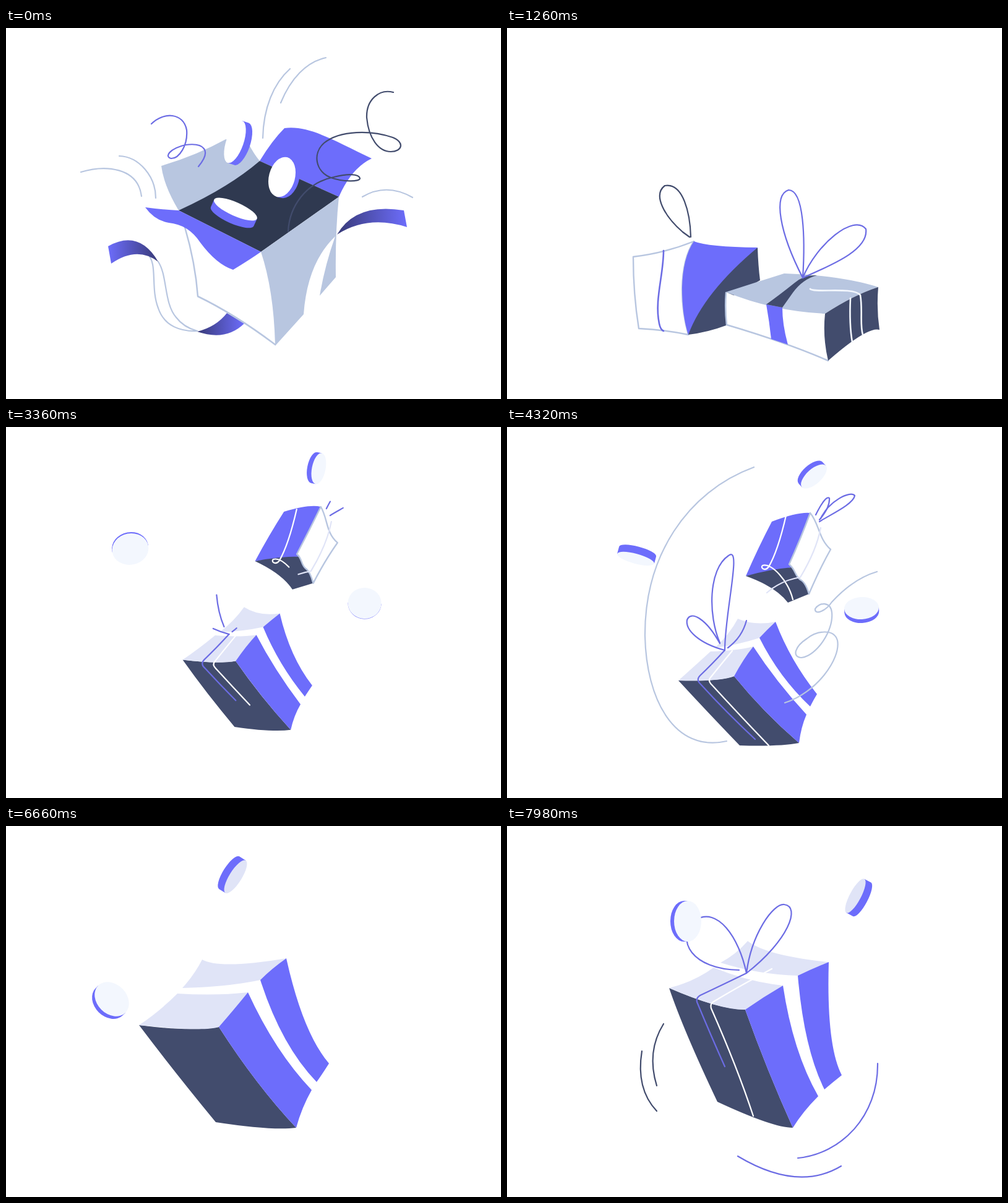
Write an HTML page that moves like this. It is 800 px wide and 600 px high and loops after 8 s.

```html
<!DOCTYPE html>
<html lang="en">
<head>
<meta charset="utf-8">
<title>Gift boxes</title>
<style>
html, body { margin: 0; width: 100%; height: 100%; overflow: hidden; background: #fff; }
svg { display: block; width: 100vw; height: 100vh; }
</style>
</head>
<body>
<svg viewBox="0 0 800 600">
  <defs>
    <linearGradient id="fadeR"><stop stop-color="#6d6dfb"/><stop offset="1" stop-color="#383a78"/></linearGradient>
    <linearGradient id="fadeL"><stop stop-color="#383a78"/><stop offset="1" stop-color="#6d6dfb"/></linearGradient>
  </defs>
  <g id="stage"></g>
</svg>
<script>
const LOOP = 8000, STEP = 60;
const VIOLET = '#6d6dfb', STRING = '#6c6ce4', MIST = '#b8c6e0', NAVY = '#424c6d',
  LILAC = '#e0e4f7', PALE = '#f3f7fe', WHITE = '#fff', INSIDE = '#2f3950';

const stage = document.getElementById('stage');
const clamp = v => Math.max(0, Math.min(1, v));
const span = (t, a, b) => clamp((t - a) / (b - a));
const easeOut = k => 1 - (1 - k) ** 3;
const lerp = (a, b, k) => a + (b - a) * k;

// Blends two paths that share one command structure.
function mix(a, b, k) {
  const goal = b.match(/-?\d+/g);
  let i = 0;
  return a.replace(/-?\d+/g, v => lerp(+v, +goal[i++], k).toFixed(1));
}

const fill = (d, color) => `<path d="${d}" fill="${color}"/>`;
const outlined = d => `<path d="${d}" fill="${WHITE}" stroke="${MIST}" stroke-width="2.4" stroke-linejoin="round"/>`;
const move = (x, y, body) => `<g transform="translate(${x.toFixed(1)} ${y.toFixed(1)})">${body}</g>`;

// Stroke showing only the part of the path between two fractions.
function line(d, color, to = 1, from = 0, width = 2.2) {
  if (to <= from) return '';
  const dash = from > 0 || to < 1
    ? `pathLength="1" stroke-dasharray="${(to - from).toFixed(3)} 2" stroke-dashoffset="${(-from).toFixed(3)}"` : '';
  return `<path d="${d}" fill="none" stroke="${color}" stroke-width="${width}" stroke-linecap="round" stroke-linejoin="round" ${dash}/>`;
}

// Disc with its rim pushed along the minor axis by h.
function coin([x, y, a, b, turn, h], face) {
  return `<g transform="translate(${x} ${y}) rotate(${turn})">` +
    fill(`M${-a} 0V${h}A${a} ${b} 0 0 ${h > 0 ? 0 : 1} ${a} ${h}V0Z`, VIOLET) +
    `<ellipse rx="${a}" ry="${b}" fill="${face}"/></g>`;
}

function coinMix(p, q, k, face) {
  const c = p.map((v, i) => lerp(v, q[i], k));
  if (p[5] * q[5] < 0) c[3] += (c[2] - c[3]) * .8 * Math.sin(Math.PI * clamp(k));
  return coin(c, face);
}

const GIFT_FILLS = [NAVY, LILAC, LILAC, VIOLET, VIOLET];
const gift = (p, q, k) => p.map((d, i) => fill(mix(d, q[i], k), GIFT_FILLS[i])).join('');

const TILT_A = [
  'M295 339Q340 351 376 351Q405 405 447 466Q420 468 362 451Q325 398 295 339Z',
  'M295 339Q325 325 348 308Q385 316 412 315Q395 330 376 351Q340 352 295 339Z',
  'M355 304Q380 289 398 270Q418 289 452 286Q440 293 424 304Q390 307 355 304Z',
  'M376 351Q395 330 412 315Q432 370 467 430Q454 446 447 466Q408 408 376 351Z',
  'M424 304Q440 293 452 286Q460 365 488 402Q481 411 475 418Q442 362 424 304Z'];
const TILT_B = [
  'M277 410Q340 412 367 403Q415 462 472 511Q440 517 376 515Q323 460 277 410Z',
  'M277 410Q305 385 329 363Q370 362 398 355Q382 375 367 403Q345 412 277 410Z',
  'M336 357Q360 335 373 310Q400 322 434 315Q420 328 408 341Q375 352 336 357Z',
  'M367 403Q382 375 398 355Q435 412 484 465Q475 486 472 511Q415 462 367 403Z',
  'M408 341Q420 328 434 315Q458 378 501 432Q495 442 490 452Q440 405 408 341Z'];
const FLOAT_A = [
  'M215 322Q300 333 344 325Q405 420 469 488Q430 493 339 479Q270 395 215 322Z',
  'M215 322Q248 300 277 271Q340 275 391 269Q370 295 344 325Q320 333 215 322Z',
  'M285 262Q305 240 317 216Q345 232 453 214Q430 230 411 249Q360 260 285 262Z',
  'M344 325Q370 295 391 269Q435 365 494 427Q478 455 469 488Q405 420 344 325Z',
  'M411 249Q430 230 453 214Q480 335 522 384Q512 400 502 414Q445 355 411 249Z'];
const FLOAT_B = [
  'M262 262Q340 296 385 297Q420 395 462 488Q430 488 340 446Q285 330 262 262Z',
  'M262 262Q302 252 334 229Q390 252 446 258Q415 276 385 297Q345 298 262 262Z',
  'M345 221Q370 208 389 186Q420 210 520 220Q490 232 470 242Q405 240 345 221Z',
  'M385 297Q415 276 446 258Q462 365 503 437Q478 462 462 488Q420 395 385 297Z',
  'M470 242Q495 230 520 220Q516 355 541 403Q527 414 513 426Q480 360 470 242Z'];

function openBox(t) {
  const u = t / 420, out = u * 14, rise = -430 * u;
  const arcs = ['M219 272C213 225 160 221 121 233', 'M242 275C242 240 215 208 183 207',
    'M415 178C416 130 432 90 459 66', 'M444 121C460 82 485 55 517 48'];
  return move(0, out, fill('M309 491Q340 483 357 461L385 478Q355 507 309 491Z', 'url(#fadeL)')) +
    line('M228 365C246 380 233 420 246 453C256 483 283 491 309 490', MIST) +
    line('M246 378C261 400 255 445 275 468Q287 484 309 490', MIST) +
    fill('M289 322Q306 380 310 434Q370 463 435 512L412 362Z', WHITE) +
    line('M289 322Q306 380 310 434Q370 463 435 512', MIST, 1, 0, 2.5) +
    fill('M251 223Q308 206 355 180L391 185Q400 203 410 215Q355 265 279 295Q255 255 251 223Z', MIST) +
    fill('M410 215Q430 182 450 162C490 157 530 182 591 211Q558 227 538 273Z', VIOLET) +
    fill('M279 295Q360 258 410 215L538 273L412 362Z', INSIDE) +
    fill('M412 362L538 273Q532 330 533 403L507 433Q515 385 532 337Q487 380 481 463L435 514Q433 425 412 362Z', MIST) +
    fill('M225 290Q255 294 279 295L412 362Q395 374 367 391Q340 382 314 347Q295 318 263 315Q240 311 225 290Z', VIOLET) +
    move(-out, 0, fill('M165 353Q215 325 246 378Q212 352 170 381Z', 'url(#fadeR)')) +
    move(out, 0, fill('M535 334Q565 282 643 295L648 322Q585 302 535 334Z', 'url(#fadeL)')) +
    arcs.map(d => line(d, MIST, 1, u)).join('') +
    line('M576 273Q615 250 657 274', MIST, 1, u) +
    line('M311 224C333 198 320 185 290 189C265 195 255 208 267 211C280 211 294 190 292 165C287 137 255 135 235 155', STRING, 1, u) +
    line('M456 329C458 288 485 250 530 241C553 235 570 236 572 243C572 249 545 249 525 242C500 232 495 203 514 186C540 165 590 165 625 177C645 185 640 200 622 200C602 200 586 178 583 145C582 116 603 98 626 104', NAVY, 1, u) +
    move(0, rise, coin([370, 184, 36, 14, -71, 11], WHITE) +
      coin([446, 241, 33, 21, -75, 7], WHITE) + coin([371, 293, 38, 11, 24, 13], WHITE));
}

function twoGifts(t) {
  const drop = -320 * (1 - easeOut(span(t, 420, 660)));
  const bow = span(t, 630, 1060), bow2 = span(t, 720, 1200), gone = span(t, 660, 900);
  const left = outlined('M204 370Q255 364 302 345Q284 372 283 423Q283 460 293 496Q255 488 213 486Q204 430 204 370Z') +
    fill('M405 355Q406 385 409 408L354 440V481Q325 492 293 496L310 420Z', NAVY) +
    fill('M302 345Q325 354 405 355Q318 428 293 496Q283 465 283 420Q284 372 302 345Z', VIOLET) +
    line('M253 360C253 400 238 440 246 478Q248 488 253 490', STRING, 1, 0, 2.6) +
    line('M295 338L284 330C255 305 235 270 255 255C285 250 296 300 297 338', NAVY, bow);
  const right = fill('M354 427Q430 462 514 462L519 538Q450 508 355 480Q352 455 354 427Z', WHITE) +
    line('M354 428Q352 455 355 480Q450 508 519 538', MIST, 1, 0, 2.5) +
    fill('M354 427Q400 412 448 397Q540 400 600 419Q560 432 514 462Q430 458 354 427Z', MIST) +
    fill('M514 462Q560 432 600 419Q597 455 602 488Q583 482 519 538Q510 500 514 462Z', NAVY) +
    fill('M419 447Q424 475 427 503L454 512Q445 480 445 452Z', VIOLET) +
    fill('M419 447Q440 432 465 412Q480 399 501 400Q478 406 462 428L445 452Z', NAVY) +
    line('M575 496C570 480 575 455 571 432C560 418 497 429 490 422', PALE, 1, 0, 2.6) +
    line('M555 437Q553 480 558 508', PALE, 1, 0, 2.6) +
    line('M478 404C440 330 430 270 455 262C480 262 482 340 478 404', STRING, bow2) +
    line('M478 404C500 350 560 300 580 325C585 360 520 385 478 404', STRING, bow2);
  const marks = t < 600 ? '' :
    line('M157 416L155 404', STRING, 1, gone) +
    line('M287 518Q310 519 330 506', STRING, 1, gone) +
    line('M617 471Q617 498 600 515', MIST, 1, gone);
  return move(0, drop, left + right) + marks;
}

function tumbling(t) {
  const k = (t - 2280) / 2040;
  const tie = span(t, 2700, 3600), bow = span(t, 3200, 4140), swirl = span(t, 3480, 4300);
  const small = fill(mix('M473 119Q515 110 530 118Q510 153 486 187L488 190Q455 187 421 190Q446 153 473 119Z',
      'M428 153Q470 137 490 139Q475 180 456 222L460 227Q425 233 386 241Q406 195 428 153Z', k), VIOLET) +
    fill(mix('M421 190Q455 187 488 190C492 193 490 202 495 208C500 212 503 220 506 233L473 239Q460 214 421 190Z',
      'M386 241Q425 230 460 227C466 230 466 241 474 247C481 250 484 258 488 270L454 284Q434 258 386 241Z', k), NAVY) +
    outlined(mix('M530 118C537 138 532 160 550 175Q527 200 506 233C503 220 500 212 495 208C489 200 493 193 486 187Q508 152 530 118Z',
      'M490 139C505 157 503 180 523 198Q505 230 488 270C484 256 480 250 474 247C465 240 466 230 456 222Q475 180 490 139Z', k));
  const smallTies =
    line('M451 143Q438 200 423 226C417 234 409 228 413 224C428 219 455 250 462 279', WHITE, tie) +
    line('M507 163Q500 200 474 243Q443 248 420 268', LILAC, tie) +
    line('M499 142Q515 110 521 115Q522 130 505 150', STRING, bow) +
    line('M505 153C520 143 560 125 562 111C555 102 520 120 507 148', STRING, bow);
  const bigTies =
    line('M352 361Q330 385 312 402Q305 409 313 416Q355 462 401 505', STRING, tie) +
    line('M364 362Q345 385 329 405Q324 410 331 417Q375 465 423 515', WHITE, tie) +
    line('M352 361C310 350 288 328 291 312C297 296 322 310 344 350', STRING, bow) +
    line('M344 349C325 305 325 230 358 208C380 190 352 300 352 361', STRING, bow) +
    line('M357 357Q380 340 387 313', STRING, bow);
  return line('M355 508C270 527 225 440 223 338C222 210 290 105 399 65', MIST, swirl) +
    small + move(40 * (1 - k), -21 * (1 - k), smallTies) +
    gift(TILT_A, TILT_B, k) + move(18 * (1 - k), -55 * (1 - k), bigTies) +
    line('M449 446C500 430 540 375 534 345C528 325 500 330 485 342C465 355 460 372 476 373C500 370 528 330 525 300C523 282 505 283 498 294C497 305 515 298 525 283Q560 245 598 234', MIST, swirl) +
    coinMix([193, 180, 28, 9, -39, 9], [208, 213, 31, 8, 15, -12], k, PALE) +
    coinMix([516, 53, 25, 10, 60, 7], [496, 80, 26, 12, 138, 8], k, PALE) +
    coinMix([587, 276, 26, 17, 8, -6], [573, 293, 28, 18, -3, 6], k, PALE);
}

function flatGift(t) {
  const away = 1 - easeOut(span(t, 4380, 4800));
  const tie = span(t, 4800, 5400), loop = .58 * span(t, 4980, 5460) + .42 * span(t, 5460, 5820);
  const arcIn = span(t, 5160, 5400), arcOut = span(t, 5520, 5940);
  const box = outlined('M211 351Q218 380 218 406Q245 424 310 443Q355 455 388 475L380 404Q290 370 211 351Z') +
    fill('M210 351Q360 332 484 288Q545 318 603 318Q575 343 482 369Q430 383 380 404Q290 370 210 351Z', MIST) +
    fill('M380 404Q430 383 482 369Q575 343 603 318Q594 360 594 391Q550 403 511 421Q430 447 388 476Z', NAVY) +
    fill('M425 352L460 340Q495 353 522 355L482 369Q450 363 425 352Z', WHITE) +
    fill('M482 369L522 355Q511 390 511 421L480 438Q476 405 482 369Z', LILAC) +
    line('M363 324Q385 337 410 345', WHITE, 1, 0, 3);
  return move(330 * away, -320 * away, box) +
    line('M555 300C505 329 378 367 302 383C293 400 303 430 307 450L289 441C278 420 270 385 277 371C310 375 380 350 420 336C425 325 420 312 385 303C345 297 305 280 302 255C302 248 310 235 318 219', STRING, tie) +
    line('M426 310C424 288 382 269 334 240', STRING, span(t, 5160, 5400)) +
    line('M428 342C420 260 440 180 500 178C512 179 515 183 514 198C510 250 460 300 428 342', NAVY, loop) +
    line('M552 126C585 142 608 175 614 206', STRING, arcIn, arcOut) +
    line('M607 311Q625 275 630 229', STRING, arcIn, arcOut);
}

function floating(t) {
  const k = Math.max(-.1, (t - 6660) / 1320);
  const lift = 64 * (1 - easeOut(span(t, 6120, 6540)));
  const tie = span(t, 6960, 7620), bow = span(t, 7260, 7860), arcs = span(t, 7320, 7920);
  const ties =
    line('M387 238Q350 256 312 274Q304 279 308 287Q330 340 352 389', STRING, tie) +
    line('M428 231Q370 262 334 284Q328 287 330 295Q372 390 398 469', WHITE, tie) +
    line('M387 238C375 180 340 130 305 152C270 185 300 232 375 233', STRING, bow) +
    line('M387 238C395 175 430 125 448 127C475 130 455 185 387 238', STRING, bow);
  return move(0, lift, gift(FLOAT_A, FLOAT_B, k)) + move(-52 * (1 - k), 30 * (1 - k), ties) +
    line('M218 364Q208 425 242 461', NAVY, arcs) +
    line('M253 320Q225 365 242 420', NAVY, arcs) +
    line('M599 384C600 470 540 530 470 537', STRING, arcs) +
    line('M373 534Q470 592 540 550', STRING, arcs) +
    coinMix([171, 280, 31, 24, 45, 6], [292, 154, 33, 22, 90, 6], k, PALE) +
    coinMix([371, 82, 31, 10, -58, -12], [563, 113, 31, 9, -62, 12], k, LILAC);
}

const scenes = [[420, openBox], [2160, twoGifts], [4380, tumbling], [6120, flatGift], [LOOP, floating]];
const start = performance.now();
let shown = -1;

function draw(now) {
  const t = Math.floor((Math.max(0, now - start) % LOOP) / STEP) * STEP;
  if (t !== shown) {
    shown = t;
    stage.innerHTML = scenes.find(([end]) => t < end)[1](t);
  }
  requestAnimationFrame(draw);
}
draw(start);
</script>
</body>
</html>
```
